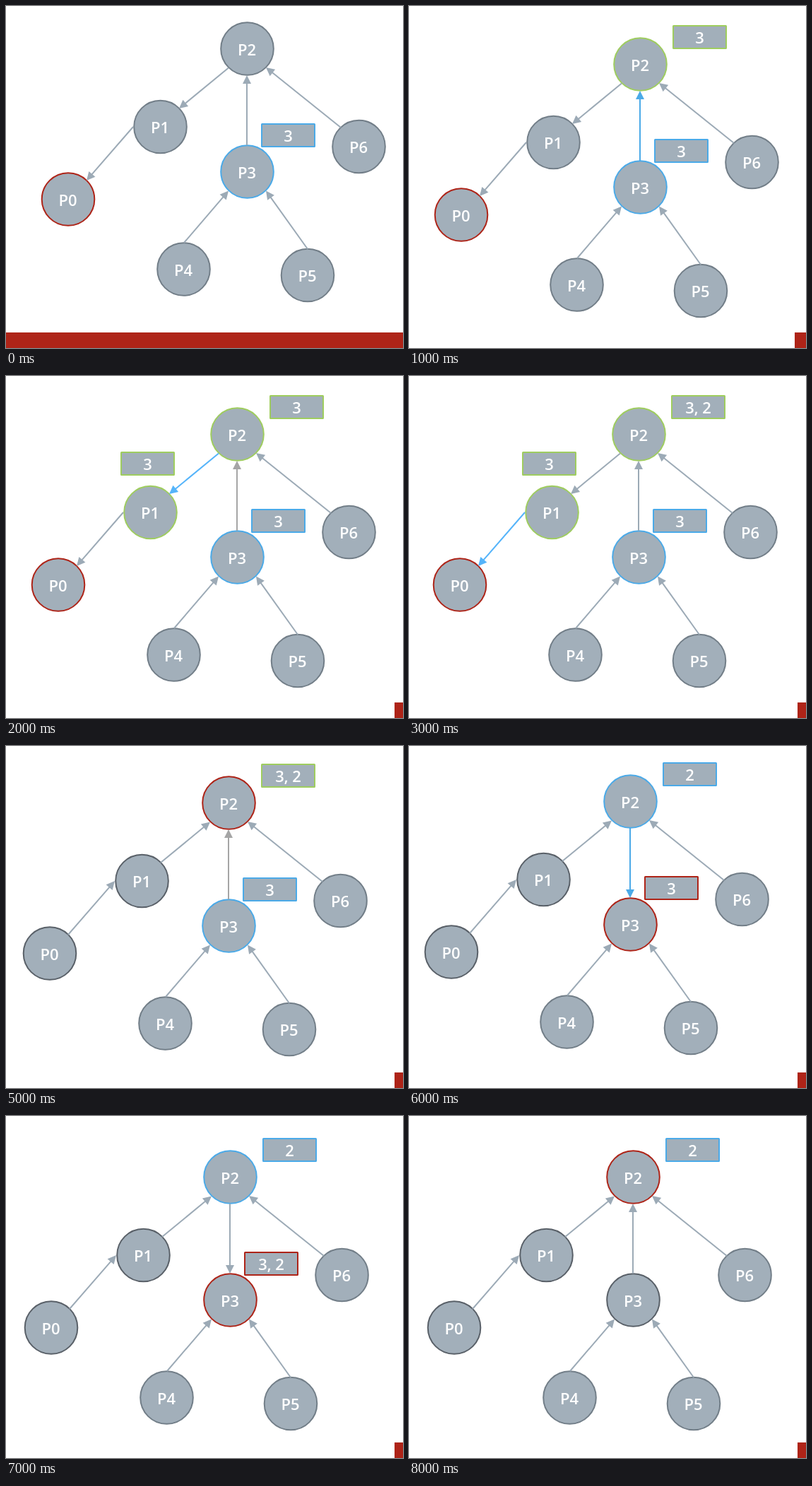
Animation, 562 px wide and 484 px high, one loop 9 s. Source, as an HTML page:

```html
<!DOCTYPE html>
<html lang="en">
<head>
<meta charset="utf-8">
<title>Token passing in a tree</title>
<style>
  html, body { margin: 0; width: 100%; height: 100%; overflow: hidden; background: #fff; }
  svg { display: block; width: 562px; height: 484px; }
  text { font-family: "Open Sans", "Noto Sans", sans-serif; font-size: 22px; font-weight: 600; fill: #fff; text-anchor: middle; }
</style>
</head>
<body>
<svg id="stage" viewBox="0 0 562 484"></svg>
<script>
const STEP = 1000;
const FILL = '#a2afba', GREY = '#9caab6', ASH = '#a5a5a5', RIM = '#727e88', DARK = '#596068';
const RED = '#ae2418', BLUE = '#4baae8', SKY = '#55b4fa', GREEN = '#9fcd5f';

// Centres of P0 to P6
const nodes = [[88, 273.5], [218.5, 171], [341.5, 60.5], [341.5, 234.5], [251.5, 372.5], [427, 381], [499.5, 199]];

// Child end, parent end
const edges = {
  1: [114, 247, 180, 171],
  2: [245, 145, 315, 87.5],
  3: [341, 197, 341, 98],
  4: [252, 335, 315, 261.5],
  5: [427, 344, 368, 261.5],
  6: [474, 172, 368, 87]
};

// Top left corners of the queue boxes
const boxes = { 1: [177, 86], 2: [388, 6], 3: [362, 167] };

// at: shift of the tree, down: edges pointing to the child
const steps = [
  { at: [0, 0], bar: 0, down: [1, 2], rims: { 0: RED, 3: BLUE }, queue: { 3: '3' } },
  { at: [-14, 22], bar: 546, down: [1, 2], rims: { 0: RED, 2: GREEN, 3: BLUE },
    lines: { 3: BLUE }, queue: { 2: '3', 3: '3' } },
  { at: [-14, 22], bar: 550, down: [1, 2], rims: { 0: RED, 1: GREEN, 2: GREEN, 3: BLUE },
    lines: { 2: SKY, 3: ASH }, queue: { 1: '3', 2: '3', 3: '3' } },
  { at: [-16, 22], bar: 550, down: [1, 2], rims: { 0: RED, 1: GREEN, 2: GREEN, 3: BLUE },
    lines: { 1: SKY }, queue: { 1: '3', 2: '3, 2', 3: '3' } },
  { at: [-16, 22], bar: 550, down: [2], rims: { 0: DARK, 1: RED, 2: GREEN, 3: BLUE },
    lines: { 3: ASH }, queue: { 1: '3', 2: '3, 2', 3: '3' } },
  { at: [-26, 20], bar: 550, down: [], rims: { 0: DARK, 1: DARK, 2: RED, 3: BLUE },
    lines: { 3: ASH }, queue: { 2: '3, 2', 3: '3' } },
  { at: [-28, 18], bar: 550, down: [3], rims: { 0: DARK, 1: DARK, 2: BLUE, 3: RED },
    lines: { 3: BLUE }, queue: { 2: '2', 3: '3' } },
  { at: [-24, 26], bar: 550, down: [3], rims: { 0: DARK, 1: DARK, 2: BLUE, 3: RED },
    queue: { 2: '2', 3: '3, 2' } },
  { at: [-24, 26], bar: 550, down: [], rims: { 0: DARK, 1: DARK, 2: RED, 3: DARK },
    queue: { 2: '2' }, boxRims: { 2: BLUE } }
];

function arrow([x1, y1, x2, y2], color) {
  const len = Math.hypot(x2 - x1, y2 - y1);
  const turn = Math.atan2(y2 - y1, x2 - x1) * 180 / Math.PI;
  return `<g transform="translate(${x1} ${y1}) rotate(${turn})">
    <path d="M0 0H${len - 10}" stroke="${color}" stroke-width="2"/>
    <path d="M${len} 0l-12 -6v12z" fill="${color}"/></g>`;
}

function node([x, y], i, rim) {
  return `<circle cx="${x}" cy="${y}" r="37.3" fill="${FILL}" stroke="${rim}" stroke-width="2"/>
    <text x="${x - 0.5}" y="${y + 9}">P${i}</text>`;
}

function box([x, y], label, rim) {
  return `<rect x="${x}" y="${y}" width="75" height="32" rx=".5" fill="${FILL}" stroke="${rim}" stroke-width="2"/>
    <text x="${x + 37.5}" y="${y + 25}">${label}</text>`;
}

function draw({ at, bar, down, rims, lines = {}, queue, boxRims = {} }) {
  const links = Object.entries(edges).map(([id, [a, b, c, d]]) =>
    arrow(down.includes(+id) ? [c, d, a, b] : [a, b, c, d], lines[id] || GREY));
  const discs = nodes.map((p, i) => node(p, i, rims[i] || RIM));
  const queues = Object.entries(queue).map(([id, label]) => {
    // The middle nodes keep a green queue while they only relay
    const rim = boxRims[id] || (id !== '3' && rims[id] === RED ? GREEN : rims[id]);
    return box(boxes[id], label, rim);
  });
  stage.innerHTML = `<g transform="translate(${at})">${discs.join('')}${links.join('')}${queues.join('')}</g>
    <rect x="${bar}" y="462" width="${562 - bar}" height="22" fill="${RED}"/>`;
}

const stage = document.getElementById('stage');
const start = performance.now();
let shown = -1;

function tick() {
  const i = Math.floor((performance.now() - start) / STEP) % steps.length;
  if (i !== shown) draw(steps[shown = i]);
  requestAnimationFrame(tick);
}
tick();
</script>
</body>
</html>
```
